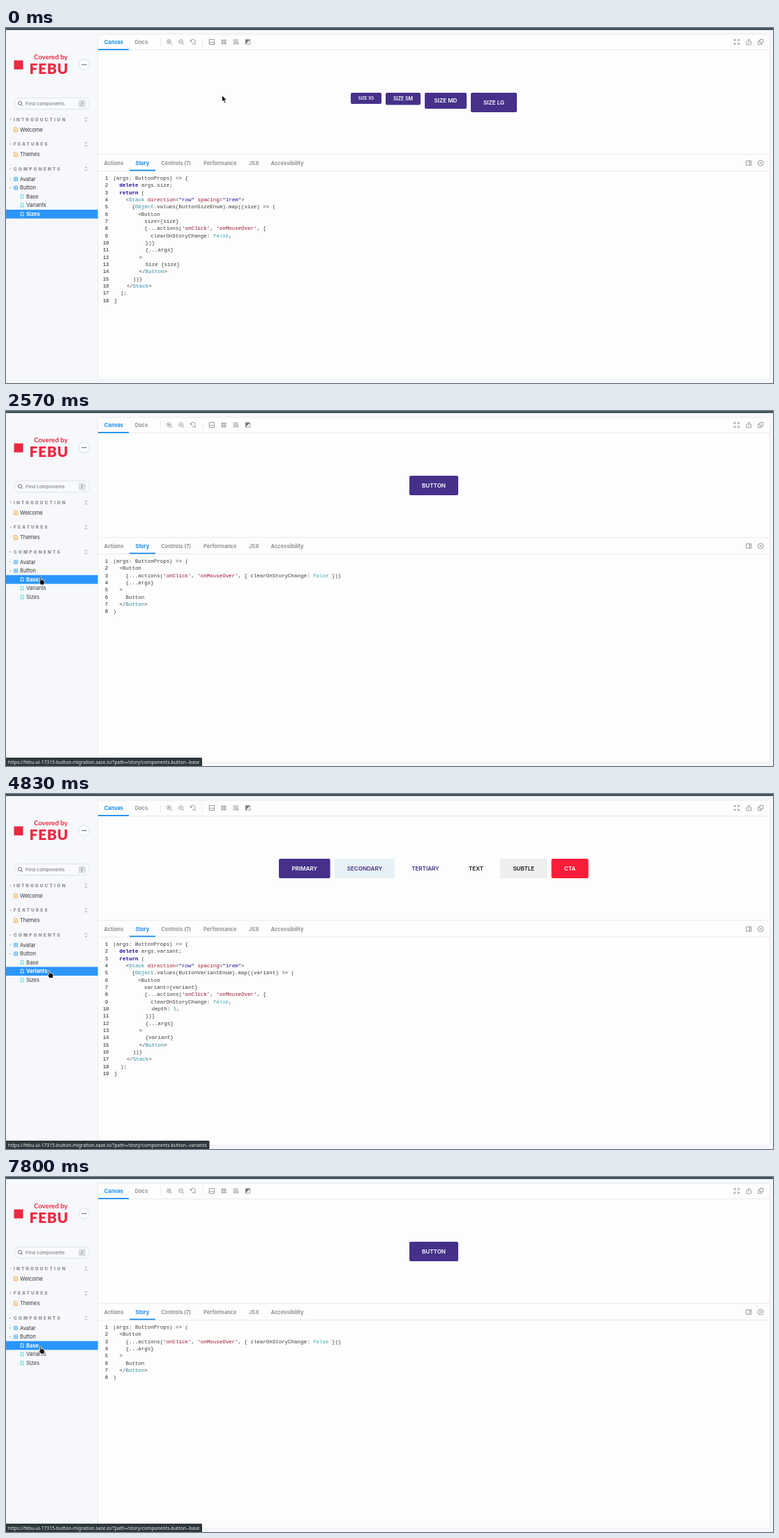
An HTML page for the animation above (8.31 s loop, 1099 px wide and 510 px high).

```html
<!DOCTYPE html>
<html lang="en">
<head>
<meta charset="utf-8">
<title>Button stories</title>
<style>
html, body { margin: 0; width: 100%; height: 100%; overflow: hidden; background: #f6f8fc; }
svg { display: block; }
text { font: 400 7.46px Inter, sans-serif; white-space: pre; fill: #333; }
.tab { font-weight: 700; fill: #949494; }
.on { fill: #1a8cec; }
.head { font-size: 6.3px; font-weight: 900; letter-spacing: .35em; fill: #959799; }
.btn { font-size: 8.05px; font-weight: 600; text-anchor: middle; }
.code text { font: 400 7.46px "Liberation Mono", monospace; fill: #393a34; }
.code .num { text-anchor: end; fill: #222; }
.k { fill: #1c0099; font-weight: 700; }
.t { fill: #2b86a0; }
.a { fill: #a0142a; }
.v { fill: #20109c; }
.s { fill: #98102c; }
.n { fill: #36acaa; }
.logo { font-family: Lato, sans-serif; fill: #ee2841; }
.url { font: 400 6.74px "Noto Sans", sans-serif; fill: #eceeee; }
.ico { fill: none; stroke: #858585; stroke-width: .8; }
</style>
</head>
<body>
<svg id="stage" width="1099" height="510" viewBox="0 0 1099 510"></svg>
<script>
const LOOP = 8310;
const PURPLE = '#46308a', BLUE = '#2a96fb', TEAL = '#37d5d3', ORANGE = '#f59a23';
const stage = document.getElementById('stage');

const esc = s => s.replace(/&/g, '&amp;').replace(/</g, '&lt;').replace(/>/g, '&gt;');
const text = (x, y, s, cls = '', extra = '') => `<text x="${x}" y="${y}" class="${cls}" ${extra}>${s}</text>`;
const rect = (x, y, w, h, fill, extra = '') => `<rect x="${x}" y="${y}" width="${w}" height="${h}" fill="${fill}" ${extra}/>`;
const icon = (x, y, d, extra = '') => `<path class="ico" transform="translate(${x} ${y})" d="${d}" ${extra}/>`;
const ring = r => `M${-r} 0a${r} ${r} 0 1 0 ${2 * r} 0a${r} ${r} 0 1 0 ${-2 * r} 0z`;

// Code lines: [class|words] marks a coloured run.
const mapLines = (name, mid, body) => `(args: ButtonProps) => {
  [k|delete] args.${name};
  [k|return] (
    <[t|Stack] [a|direction]=[v|"row"] [a|spacing]=[v|"1rem"]>
      {[t|Object].values(${mid}).map((${name}) => (
        <Button
          ${name}={${name}}
          {...actions([s|'onClick'], [s|'onMouseOver'], {
            clearOnStoryChange: [n|false],
${name === 'variant' ? '            depth: [n|5],\n' : ''}          })}
          {...args}
        >
          ${body}
        </[t|Button]>
      ))}
    </[t|Stack]>
  );
}`;

const stories = {
  base: {
    code: `(args: ButtonProps) => (
  <Button
    {...actions([s|'onClick'], [s|'onMouseOver'], { clearOnStoryChange: [n|false] })}
    {...args}
  >
    Button
  </[t|Button]>
)`,
    buttons: [['BUTTON', 578, 70]]
  },
  variants: {
    code: mapLines('variant', 'ButtonVariantEnum', '{variant}'),
    buttons: [
      ['PRIMARY', 391, 73.5],
      ['SECONDARY', 471, 86, { bg: '#e8f2f6', fg: PURPLE }],
      ['TERTIARY', 563, 76, { bg: 'none', fg: PURPLE }],
      ['TEXT', 645, 57, { bg: 'none', fg: '#1c1c24' }],
      ['SUBTLE', 708, 67.5, { bg: '#eeeeef', fg: '#1c1c24' }],
      ['CTA', 781.5, 53, { bg: '#fb1c39' }]
    ]
  },
  sizes: {
    code: mapLines('size', 'ButtonSizeEnum', 'Size {size}'),
    buttons: [
      ['SIZE XS', 494, 44, { h: 16, size: 5.9 }],
      ['SIZE SM', 544, 50, { h: 17.5, size: 7 }],
      ['SIZE MD', 600, 60, { h: 23 }],
      ['SIZE LG', 666, 66]
    ]
  }
};
const ids = ['base', 'variants', 'sizes'];
const rowTop = i => 235.7 + i * 12.65;

function button([label, x, w, o = {}]) {
  const { h = 28, size = 8.05, bg = PURPLE, fg = '#fff' } = o;
  return rect(x, 93, w, h, bg, 'rx="2"') +
    text(x + w / 2, 93 + h / 2 + size * .364, label, 'btn', `style="font-size:${size}px;fill:${fg}"`);
}

function codeBlock(src) {
  return src.split('\n').map((line, i) => {
    const y = 218 + i * 10.325, wide = i > 8;
    const body = esc(line).replace(/\[(\w)\|([^\]]*)\]/g, '<tspan class="$1">$2</tspan>');
    return text(wide ? 147.6 : 146.3, y, i + 1, 'num') + text(wide ? 155 : 153.6, y, body);
  }).join('');
}

function heading(y, label, open) {
  const d = open ? 'M-1.8 -1.2L0 -3 1.8 -1.2M-1.8 1.2L0 3 1.8 1.2' : 'M-1.8 -3L0 -1.2 1.8 -3M-1.8 3L0 1.2 1.8 3';
  return text(11, y + 2.3, label, 'head') + icon(114.5, y, d) +
    `<path d="M4.8 ${y - .8}h3l-1.5 1.8z" fill="#aaa"/>`;
}

const docIcon = y => icon(14, y, 'M-2.6 -3h3.6l1.6 1.6V3h-5.2zM-1.2 -.6h2.4M-1.2 1.2h2.4', `style="stroke:${ORANGE}"`);
const gridIcon = y => icon(14, y, 'M-2.5 -2.5h5v5h-5zM0 -2.5v5M-2.5 0h5', `style="stroke:#39a5f5"`);

function sidebar() {
  let s = rect(11.5, 46.5, 13, 13, '#ee2841');
  s += text(40, 45, 'Covered by', 'logo', 'style="font-size:9.6px;font-weight:700"');
  s += text(33.5, 66, 'FEBU', 'logo', 'style="font-size:21px;font-weight:900;letter-spacing:.6px"');
  s += `<circle cx="112" cy="52.5" r="7.6" fill="#fbfcfe" stroke="#cfd4d9" stroke-width=".7"/>`;
  s += [109.6, 112, 114.4].map(x => `<circle cx="${x}" cy="52.5" r=".85" fill="#444"/>`).join('');
  s += rect(12, 100.5, 108, 16, '#f9fafd', 'rx="8" stroke="#d3d8de" stroke-width=".7"');
  s += icon(20, 108, ring(2.6) + 'M1.9 1.9L4 4', 'style="stroke:#555"');
  s += text(28, 111, 'Find components', '', 'style="font-size:6.85px;fill:#686a6d"');
  s += rect(104, 103.5, 10, 10, '#dcdee1', 'rx="1.5"') + text(107.6, 111, '/', '', 'style="font-size:6.3px;fill:#555"');
  s += heading(131.5, 'INTRODUCTION') + docIcon(146) + text(20, 148.7, 'Welcome');
  s += heading(167, 'FEATURES') + docIcon(181.7) + text(20, 184.4, 'Themes');
  s += heading(202.5, 'COMPONENTS', true);
  s += gridIcon(217) + text(20, 219.7, 'Avatar') + '<path d="M5.6 215.6v2.8l1.6-1.4z" fill="#aaa"/>';
  s += gridIcon(229.6) + text(20, 232.3, 'Button') + '<path d="M4.8 228.9h3l-1.5 1.8z" fill="#aaa"/>';
  ids.forEach((id, i) => {
    const y = rowTop(i);
    s += `<g id="row-${id}">` + rect(0, y, 131.6, 12.65, 'none') +
      icon(23, y + 6.5, 'M-1.9 -2.8h3.8v5.6L0 1.2 -1.9 2.8z') +
      text(29, y + 9.1, id[0].toUpperCase() + id.slice(1)) + '</g>';
  });
  return s;
}

function frame() {
  const line = (x, y, w, h) => rect(x, y, w, h, '#e3e6e9');
  let s = rect(131.7, 9, 963.3, 496, '#fdfdfd', 'rx="2" stroke="#e2e5e8" stroke-width=".8"');
  s += rect(0, 0, 1099, 3, '#44535c');
  s += line(132, 31, 963, .8) + line(132, 181.3, 963, .8) + line(132, 205, 963, .8);
  s += line(221, 14.5, .8, 12) + line(281.2, 14.5, .8, 12);
  s += text(140.8, 22.9, 'Canvas', 'tab on') + text(184.8, 22.9, 'Docs', 'tab');
  s += rect(132, 30, 44, 1.8, '#1a8cec') + rect(177, 203.6, 37, 1.8, '#1a8cec');
  const tabs = [['Actions', 140.5], ['Story', 185.5], ['Controls (7)', 222.3], ['Performance', 283], ['JSX', 348], ['Accessibility', 379.5]];
  s += tabs.map(([t, x]) => text(x, 196.9, t, t === 'Story' ? 'tab on' : 'tab')).join('');

  const lens = ring(2.9) + 'M2 2L4.4 4.4';
  s += icon(233.4, 19.6, lens + 'M-1.4 0h2.8M0 -1.4v2.8') + icon(250.6, 19.6, lens + 'M-1.4 0h2.8');
  s += icon(268, 20, 'M-3.6 -3.2v2.6h2.6M-3.3 -.8A3.3 3.3 0 1 1 -1.6 2.4M2 2L4 4.2');
  s += icon(294.8, 20, 'M-3.7 -3.5h7.4v7h-7.4zM-3.4 2L-1.3 -.4 .5 1.3 1.7 0 3.5 2');
  s += icon(312, 20, 'M-3 -3h2.2v2.2H-3zM.8 -3H3v2.2H.8zM-3 .8h2.2V3H-3zM.8 .8H3V3H.8z');
  s += icon(329, 20, 'M-3.5 -3h7M-3.5 -1h7M-3.5 1H0M-3.5 3H0M1 .8h2.5V3H1z');
  s += icon(346.5, 20, 'M-3.2 -3.2h6.4v6.4h-6.4z') + '<path d="M343.3 23.2v-6.4h6.4z" fill="#777"/>';
  s += icon(1047, 20, 'M-3.6 -1.4V-3.6h2.2M3.6 -1.4V-3.6H1.4M-3.6 1.4V3.6h2.2M3.6 1.4V3.6H1.4M-3.4 -3.4L-1 -1M3.4 -3.4L1 -1M-3.4 3.4L-1 1M3.4 3.4L1 1');
  s += icon(1064.3, 20, 'M-1.6 -1H-3.2V3.8H3.2V-1H1.6M0 1.5V-3.8M-1.7 -2.2L0 -3.9 1.7 -2.2');
  s += icon(1081.3, 20, 'M-1.2 -3.6h4.8v4.8h-4.8zM-1.2 -1.2h-2.4v4.8h4.8V1.2');
  s += icon(1064.3, 194, 'M-3.7 -3.2h7.4v6.4h-7.4zM.9 -3.2v6.4M1.9 -1.5h1M1.9 0h1');
  s += icon(1081.3, 194, ring(3.9) + 'M-1.6 -1.6L1.6 1.6M1.6 -1.6L-1.6 1.6');
  return s;
}

stage.innerHTML = frame() + sidebar() +
  ids.map(id => `<g id="story-${id}">${stories[id].buttons.map(button).join('')}<g class="code">${codeBlock(stories[id].code)}</g></g>`).join('') +
  `<g id="status">${rect(-3, 498, 284, 15, '#2d383d', 'id="bar" rx="1.5"')}${text(2.8, 506.5, '', 'url', 'id="url"')}</g>
  <g id="cursor" stroke="#fff" stroke-width=".8" stroke-linejoin="round" fill="#111">
    <path id="arrow" d="M0 0V9.4L2.2 7.4 3.9 11.2 5.6 10.4 3.9 6.9H6.8Z"/>
    <path id="hand" d="M-.9 .7Q0 -.6 .9 .7V4.2Q2 3.4 2.6 4.5Q3.7 3.8 4.2 4.9Q5.8 4.6 5.7 6.2V8.4Q5.5 9.9 4.8 11.3H.4Q-.8 9.4 -2.2 7.8Q-2.9 6.4 -1.7 6.3L-.9 7Z"/>
  </g>`;
const $ = id => document.getElementById(id);

// Pointer stops: time, x, y
const path = [
  [0, 309.5, 96.7], [470, 309.5, 96.7], [700, 290, 112], [900, 290, 112],
  [1630, 48.8, 235.8], [2200, 48.8, 235.8], [2500, 49.5, 238.5], [3030, 49.5, 238.5],
  [3070, 128, 248], [3300, 128, 248], [3570, 144.3, 218], [3740, 142, 166],
  [4070, 62, 253.2], [5030, 62, 253.2], [5230, 40.8, 267.2], [6270, 40.8, 267.2],
  [6800, 49.5, 242.8], [LOOP, 49.5, 242.8]
];
const rowPicks = [[0, 'sizes'], [2240, 'base'], [4570, 'variants'], [5935, 'sizes'], [7510, 'base']];
const storyPicks = [[0, 'sizes'], [2400, 'base'], [4700, 'variants'], [6030, 'sizes'], [7640, 'base']];
const links = [[1560, 'base'], [3660, ''], [4020, 'variants'], [5190, 'sizes'], [6480, 'variants'], [6700, 'base']];
const barWidth = { base: 281, variants: 291.5, sizes: 282 };

const at = (list, t) => list.reduce((v, [from, name]) => t >= from ? name : v, '');
const ease = u => u * u * (3 - 2 * u);

function pointer(t) {
  const i = path.findIndex(p => p[0] > t);
  const [t0, x0, y0] = path[i - 1], [t1, x1, y1] = path[i];
  const u = ease((t - t0) / (t1 - t0));
  return [x0 + (x1 - x0) * u, y0 + (y1 - y0) * u];
}

const show = (el, on) => { el.style.display = on ? '' : 'none'; };

function draw(t) {
  const [x, y] = pointer(t);
  const selected = at(rowPicks, t), story = at(storyPicks, t), link = at(links, t);
  ids.forEach((id, i) => {
    const [bg, mark, label] = $('row-' + id).children;
    const on = id === selected;
    const over = x < 131 && y >= rowTop(i) && y < rowTop(i + 1);
    bg.setAttribute('fill', on ? BLUE : over ? '#e7e9eb' : 'none');
    mark.style.stroke = on ? '#fff' : TEAL;
    label.style.fill = on ? '#fff' : '#333';
    label.style.fontWeight = on ? 700 : 400;
    show($('story-' + id), id === story);
  });
  show($('status'), link);
  if (link) {
    $('bar').setAttribute('width', barWidth[link] + 3);
    $('url').textContent = 'https://febu-ui-17315-button-migration.saze.io/?path=/story/components-button--' + link;
  }
  const busy = t >= 5880 && t < 6130;
  const hand = x < 131 && y > 210 && y < 274 && !busy;
  show($('hand'), hand);
  show($('arrow'), !hand);
  $('cursor').setAttribute('transform', `translate(${x.toFixed(2)} ${y.toFixed(2)})`);
}

const start = performance.now();
function tick() {
  draw((performance.now() - start) % LOOP);
  requestAnimationFrame(tick);
}
tick();
</script>
</body>
</html>
```
